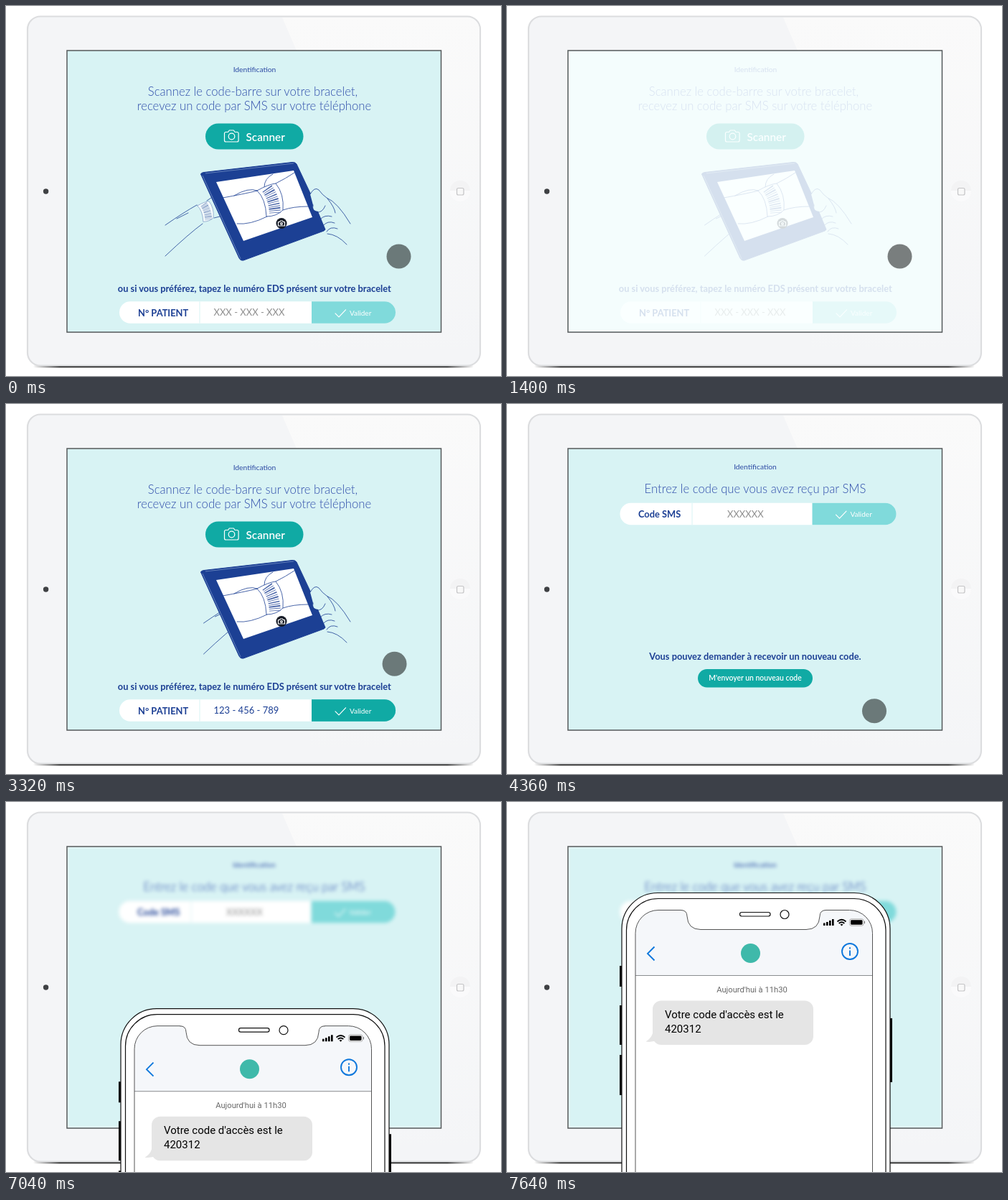
An HTML page for the animation above (8 s loop, 690 by 515 pixels).

```html
<!DOCTYPE html>
<html lang="fr">
<head>
<meta charset="utf-8">
<title>Identification par bracelet</title>
<style>
  html, body { margin: 0; width: 690px; height: 515px; overflow: hidden; background: #fff; }
  svg { display: block; }
  text { font-family: Lato, sans-serif; }
  .label { font-size: 10.3px; fill: #2c4aa3; text-anchor: middle; }
  .title { font-size: 16.7px; font-weight: 300; fill: #2f4dab; text-anchor: middle; }
  .bold { font-size: 12.85px; font-weight: 700; fill: #1c3f94; }
  .mid { text-anchor: middle; }
  .button { font-weight: 600; fill: #fff; }
  .hint { font-size: 13px; fill: #8f8f8f; }
  .ink { fill: none; stroke: #1c3f94; stroke-width: .8; stroke-linecap: round; }
  .white { fill: none; stroke: #fff; stroke-width: 1.2; stroke-linejoin: round; stroke-linecap: round; }
  .edge { fill: #fff; stroke: #111; stroke-width: 1.2; }
  .blue { fill: none; stroke: #0f78dc; stroke-width: 1.9; }
  .phone text { font-family: Roboto, sans-serif; }
</style>
</head>
<body>
<svg width="690" height="515" viewBox="0 0 690 515">
  <defs>
    <clipPath id="glass"><rect x="85" y="62" width="521.5" height="392"/></clipPath>
    <linearGradient id="shade" x2="1">
      <stop offset="0" stop-color="#222" stop-opacity="0"/>
      <stop offset=".06" stop-color="#222"/>
      <stop offset=".94" stop-color="#222"/>
      <stop offset="1" stop-color="#222" stop-opacity="0"/>
    </linearGradient>
    <linearGradient id="glare" x2="0" y2="1">
      <stop offset="0" stop-color="#fafafa"/>
      <stop offset="1" stop-color="#fafafa" stop-opacity="0"/>
    </linearGradient>
    <g id="band">
      <path d="M350 257Q362 268 363 293Q377 293 386 284Q388 262 376 247Q366 248 350 257Z" class="ink" style="fill:#fff"/>
      <path d="M364 254Q374 268 375 288" fill="none" stroke="#4a66a9" stroke-width="16" stroke-dasharray="1.4 1.8 .8 1.6 1.8 1.6 .8 2"/>
    </g>
    <!-- input field, origin at its top left -->
    <path id="side" d="M268 0h101.8a15.2 15.2 0 0 1 0 30.5H268z"/>
    <g id="field">
      <rect width="385" height="30.5" rx="15.2" fill="#fff"/>
      <use href="#side" fill="#80dadb"/>
    </g>
    <g id="valid">
      <path class="white" d="M301 16.5l5 5 9.5-10"/>
      <text x="321" y="19.6" font-size="10" fill="#fff">Valider</text>
    </g>
  </defs>

  <!-- tablet -->
  <rect x="38" y="499" width="614" height="4.2" rx="2" fill="url(#shade)"/>
  <rect x="30" y="14.5" width="631" height="486" rx="18" fill="#f4f5f7" stroke="#dcdddf" stroke-width="2.2"/>
  <path d="M385 16H643a17 17 0 0 1 17 17V499H425L405 62Z" fill="url(#glare)"/>
  <circle cx="55.6" cy="258" r="3.7" fill="#3f4144"/>
  <circle cx="633" cy="258" r="14" fill="#fafafb"/>
  <path d="M619 257a14 14 0 0 1 28 0z" fill="#f3f3f4"/>
  <rect x="628.5" y="253.5" width="9.5" height="9.5" rx="2" fill="#f8f8f8" stroke="#c4c4c6" stroke-width="1.2"/>

  <g clip-path="url(#glass)">
    <rect x="85" y="62" width="522" height="392" fill="#fff"/>
    <g id="content">
      <rect x="85" y="62" width="522" height="392" fill="#d8f3f4"/>

      <g id="scan">
        <text class="label" x="346.5" y="92">Identification</text>
        <text class="title" x="344" y="125">Scannez le code-barre sur votre bracelet,</text>
        <text class="title" x="346" y="145.3">recevez un code par SMS sur votre téléphone</text>
        <rect x="278" y="163.5" width="136.5" height="36" rx="18" fill="#10aaa4"/>
        <path class="white" d="M306.500 175.500h3l1.800-2.500h6l1.800 2.500h3q2 0 2 2v9.500q0 2-2 2h-15.600q-2 0-2-2v-9.500q0-2 2-2z"/>
        <circle class="white" cx="314.500" cy="181.500" r="4.300"/>
        <text class="button" x="334.500" y="187.700" font-size="15.300">Scanner</text>

        <g id="arm">
          <path class="ink" d="M222 305Q248 287 266 277M280 271Q292 264 300 256M222 348Q256 316 274 303M290 295L306 291M238 296L254 288"/>
          <use href="#band" transform="translate(49.8 118.6) scale(.62)" opacity=".75"/>
        </g>

        <!-- drawn tablet -->
        <path d="M271.500 234Q272 232 276 231.500L399 217.500Q403 217 405 220L446 307Q447 311 443 313L331 354Q327 355 325 351Z" fill="#1c4094" stroke="#1c3f94"/>
        <path d="M274 236L327 352M278 233L401 219" fill="none" stroke="#7f9acb" stroke-width=".7"/>
        <path d="M293 245L401 229L427 294L331 327Z" fill="#fff"/>
        <path class="ink" d="M302 267Q330 262 351 257M322 303Q340 305 364 293M318 264Q338 252 350 257M376 247Q390 240 402 232M386 284Q400 279 421 279M360 252Q360 240 372 234"/>
        <use href="#band"/>
        <circle cx="384" cy="302.500" r="7.500" fill="#151a26"/>
        <path class="white" d="M379.500 300.500h2l1-1.500h3l1 1.500h2v5.500h-9z"/>
        <circle class="white" cx="384" cy="303" r="1.300"/>

        <!-- holding hand -->
        <path d="M424 262Q430 251 436 256Q441 263 447 267Q462 273 480 303L475 332Q462 318 448 317L435 286Q426 285 428 277Z" fill="#d8f3f4"/>
        <path class="ink" d="M424 262Q430 251 436 256Q441 263 447 267Q462 273 480 303M475 332Q462 318 448 317M428 277Q426 285 433 287Q441 288 445 278M438 297Q444 290 454 293M442 306Q448 298 458 302M447 314Q452 306 462 310M448 268Q458 280 459 288"/>

        <text class="bold mid" x="346.300" y="398.300">ou si vous préférez, tapez le numéro EDS présent sur votre bracelet</text>
        <use href="#field" x="158" y="411.300"/>
        <path d="M270 411.500v30" stroke="#d8f3f4"/>
        <text class="bold" x="184" y="431.500">N° PATIENT</text>
        <text id="empty" class="hint" x="289.500" y="431.300">XXX - XXX - XXX</text>
        <g id="filled">
          <text class="hint" x="289.500" y="431.300" style="fill:#1c3f94">123 - 456 - 789</text>
          <use href="#side" x="158" y="411.300" fill="#10aaa4"/>
        </g>
        <use href="#valid" x="158" y="411.300"/>
      </g>

      <g id="sms">
        <text class="label" x="346" y="91">Identification</text>
        <text class="title" x="346" y="123.700">Entrez le code que vous avez reçu par SMS</text>
        <use href="#field" x="157.500" y="137.700"/>
        <path d="M258 138v30" stroke="#d8f3f4"/>
        <text class="bold" x="183" y="158">Code SMS</text>
        <text class="hint" x="307" y="157.800">XXXXXX</text>
        <use href="#valid" x="157.500" y="137.700"/>
        <text class="bold mid" x="346" y="356">Vous pouvez demander à recevoir un nouveau code.</text>
        <rect x="266" y="369" width="160" height="25.500" rx="12.750" fill="#10aaa4"/>
        <text class="button mid" x="346" y="385.300" font-size="10.400">M'envoyer un nouveau code</text>
      </g>
    </g>
    <rect id="flash" x="85" y="62" width="522" height="392" fill="#faffff"/>
  </g>
  <rect x="85" y="62" width="521.500" height="392" fill="none" stroke="#55595b" stroke-width="1.500"/>
  <circle id="cursor" r="17"/>

  <g id="phone" class="phone">
    <path d="M157 228h4v29h-4zM157 283h4v55h-4zM157 352h4v56h-4zM533 301h4v89h-4z"/>
    <rect class="edge" x="160" y="126.500" width="374" height="800" rx="50"/>
    <rect class="edge" x="166.500" y="134.500" width="361.500" height="800" rx="44"/>
    <path d="M179 241.500V182a32 32 0 0 1 32-32H477.500a32 32 0 0 1 32 32v59.500z" fill="#f5f7fa"/>
    <path d="M179 241.500H509.500" stroke="#8a8d90"/>
    <rect x="179" y="150.500" width="330.500" height="800" rx="32" fill="none" stroke="#555"/>
    <path d="M242 148V150.500Q251 150.500 251 159Q252 177.500 270 177.500H417Q435 177.500 436 159Q436 150.500 445 150.500V148Z" fill="#fff"/>
    <path d="M242 150.500Q251 150.500 251 159Q252 177.500 270 177.500H417Q435 177.500 436 159Q436 150.500 445 150.500" fill="none" stroke="#555"/>
    <rect class="edge" x="324.500" y="153.500" width="42.500" height="5.500" rx="2.700"/>
    <circle class="edge" cx="387" cy="156.500" r="6"/>

    <!-- status icons -->
    <path d="M441 168.500h2.600v3.500H441zM445 167h2.600v5H445zM449 165h2.600v7H449zM453 163h2.600v9H453z"/>
    <path d="M460.500 166.500q6-5.500 12 0M462.700 169q3.800-3.500 7.600 0" fill="none" stroke="#000" stroke-width="1.800"/>
    <path d="M464.500 170.600q2-1.600 4 0l-2 2z"/>
    <rect x="477.500" y="162.800" width="19.500" height="9.400" rx="2.500" fill="#fff" stroke="#999" stroke-width=".8"/>
    <rect x="479" y="164.200" width="16.500" height="6.600" rx="1.400"/>
    <path d="M498.500 165.800v3.400" stroke="#777"/>

    <path class="blue" d="M205.500 201.500L196 211l9.500 9.500"/>
    <circle cx="339.500" cy="210.500" r="13.500" fill="#3fb9aa"/>
    <circle class="blue" cx="478" cy="208" r="11"/>
    <path class="blue" d="M478 202.300v2.200M478 206.500v7.500"/>

    <text class="mid" x="341.500" y="265" font-size="11.200" fill="#686868">Aujourd'hui à 11h30</text>
    <path d="M203 322Q201 329 193.500 333.500Q202 335 210 331Z" fill="#e5e5e5"/>
    <rect x="203" y="276.500" width="224" height="61.500" rx="12" fill="#e5e5e5"/>
    <text x="220" y="301" font-size="15">Votre code d'accès est le</text>
    <text x="220" y="321" font-size="15">420312</text>
  </g>
</svg>
<script>
  const $ = id => document.getElementById(id);
  const set = (id, name, value) => $(id).setAttribute(name, value);
  const ramp = (t, from, to) => Math.min(1, Math.max(0, (t - from) / (to - from)));
  const sine = p => (1 - Math.cos(Math.PI * p)) / 2;

  function draw(t) {
    const onSms = t >= 4360;
    set('scan', 'display', onSms ? 'none' : 'inline');
    set('sms', 'display', onSms ? 'inline' : 'none');

    set('arm', 'transform', `translate(${53.5 * sine(ramp(t, 0, 760))} 0)`);
    set('flash', 'opacity', ramp(t, 1200, 1440) - ramp(t, 1440, 1680));

    const fill = ramp(t, 2240, 2680);
    set('empty', 'opacity', 1 - fill);
    set('filled', 'opacity', fill);

    const move = sine(ramp(t, 3160, 3760));
    set('cursor', 'cx', 547.5 - 35.5 * move);
    set('cursor', 'cy', 348.5 + 78.7 * move);
    set('cursor', 'opacity', .5 * (1 - ramp(t, 5480, 5600)));

    const blur = 2.5 * ramp(t, 5880, 6360);
    $('content').style.filter = blur ? `blur(${blur}px)` : 'none';

    // cubic ease-out from below the stage
    const left = (1 - ramp(t, 6840, 7640)) ** 3;
    set('phone', 'transform', `translate(0 ${384 * left})`);
    set('phone', 'display', t < 6860 ? 'none' : 'inline');
  }

  const start = performance.now();
  function tick() {
    draw((performance.now() - start) % 8000);
    requestAnimationFrame(tick);
  }
  tick();
</script>
</body>
</html>
```
